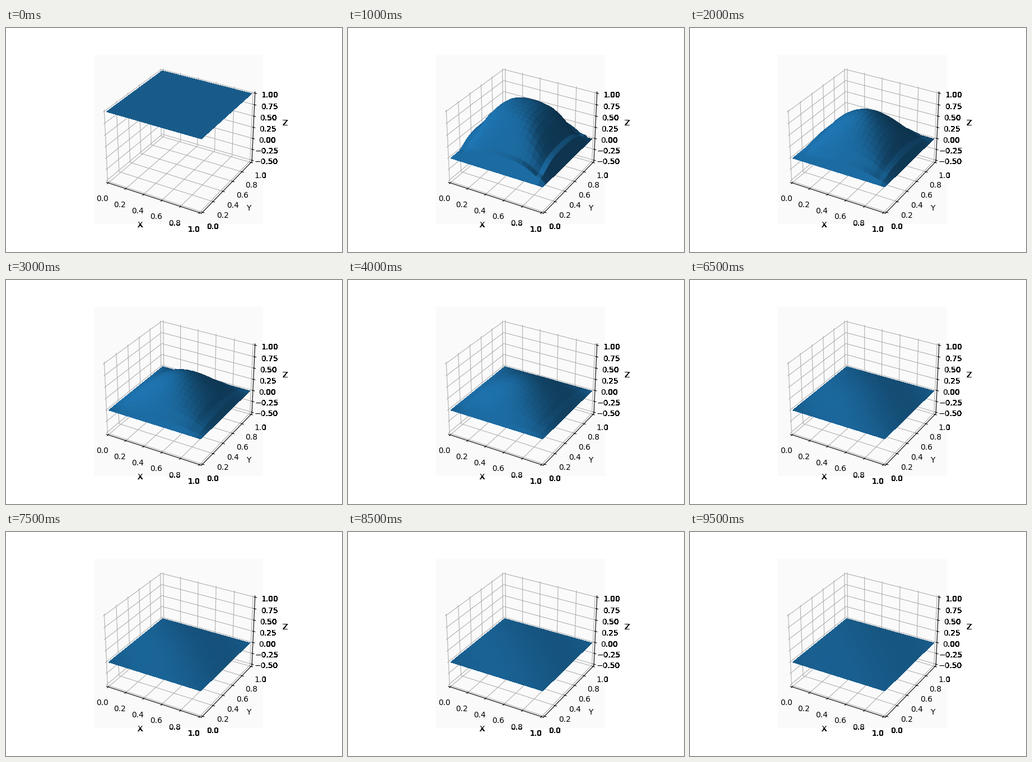
Animation, 600 px wide and 400 px high, one loop 10000 ms. Source, as a matplotlib script:

```python
import numpy as np
import matplotlib.pyplot as plt
from matplotlib.animation import FuncAnimation

CELLS = 20
FRAMES = 20
INTERVAL = 500
DIFFUSION = 0.0088  # diffusivity times the time step
PAPER = "#fafafa"

plt.rcParams["axes3d.automargin"] = True


def diffuse_profiles():
    """Crank-Nicolson steps of a unit slab whose ends are held at zero."""
    inner = CELLS - 1
    r = DIFFUSION * CELLS**2
    stencil = 2 * np.eye(inner) - np.eye(inner, k=1) - np.eye(inner, k=-1)
    step = np.linalg.solve(np.eye(inner) + r / 2 * stencil,
                           np.eye(inner) - r / 2 * stencil)
    profiles = [np.ones(CELLS + 1)]
    for _ in range(FRAMES - 1):
        profiles.append(np.pad(step @ profiles[-1][1:-1], 1))
    return profiles


def harden_alpha(image, dpi):
    """Make every visibly covered pixel fully opaque."""
    hard = image.copy()
    hard[..., 3] = image[..., 3] > 0.12
    return hard, 0, 0


fig = plt.figure(figsize=(6, 4), dpi=100, facecolor="white")
fig.subplots_adjust(left=0.125, right=0.9, bottom=0.125, top=0.88)
ax = fig.add_subplot(projection="3d", facecolor=PAPER)
ax.set_agg_filter(harden_alpha)
ax.set(xlim=(0, 1), ylim=(0, 1), zlim=(-0.5, 1),
       xlabel="X", ylabel="Y", zlabel="Z")
for axis in (ax.xaxis, ax.yaxis, ax.zaxis):
    axis.set_pane_color(PAPER)

grid = np.linspace(0, 1, CELLS + 1)
X, Y = np.meshgrid(grid, grid)
profiles = diffuse_profiles()
surface = None


def update(frame):
    global surface
    if surface is not None:
        surface.remove()
    profile = profiles[frame]
    surface = ax.plot_surface(X, Y, np.outer(profile, profile), color="C0")
    ax.set(xlim=(0, 1), ylim=(0, 1), zlim=(-0.5, 1))
    return [surface]


anim = FuncAnimation(fig, update, frames=FRAMES, interval=INTERVAL,
                     init_func=lambda: update(0), repeat=True, repeat_delay=0)
plt.show()
```
